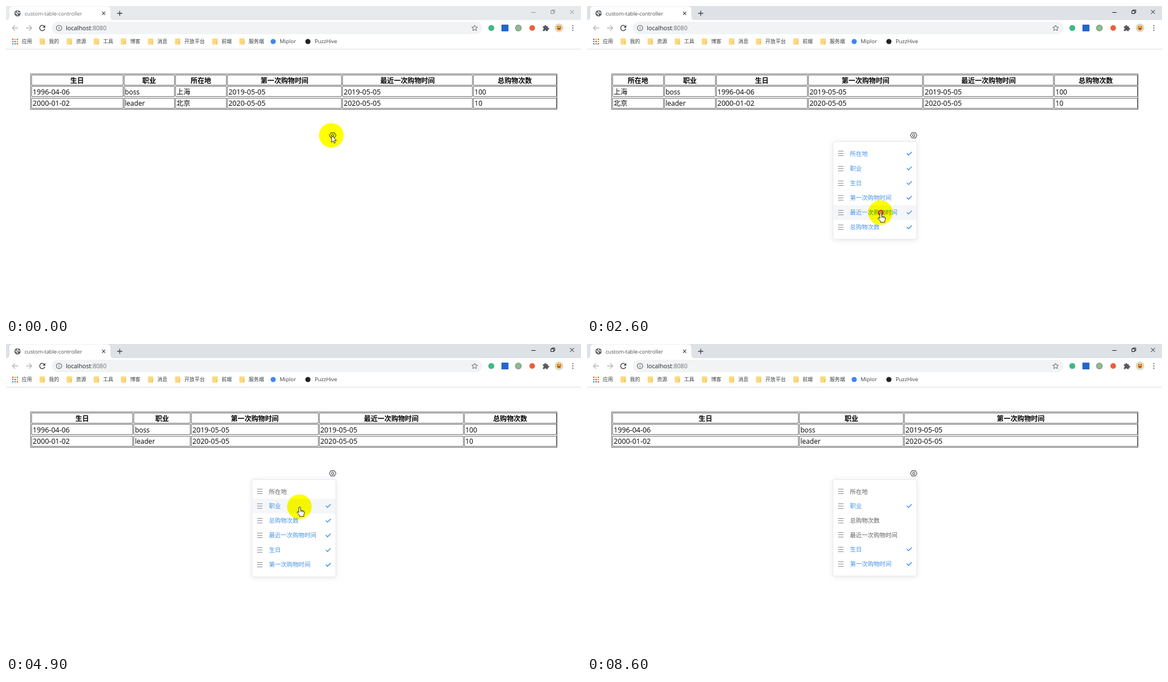
Recreate the animation shown at these times as an HTML page. Size 1019 px wide and 550 px high, loop 9100 ms.

```html
<!DOCTYPE html>
<html lang="zh-CN">
<head>
<meta charset="utf-8">
<title>custom-table-controller</title>
<style>
  html, body { margin: 0; width: 100%; height: 100%; overflow: hidden; background: #fff; }
  svg { display: block; font-family: "Open Sans", "Noto Sans CJK SC", "Noto Sans CJK", sans-serif; }
  #halo { mix-blend-mode: multiply; }
  .panel { filter: drop-shadow(0 1.5px 4px rgba(0, 0, 0, .1)); }
</style>
</head>
<body>
<svg width="1019" height="550" viewBox="0 0 1019 550">
  <rect width="1019" height="550" fill="#fff"/>
  <g id="browser"></g>
  <g id="table"></g>
  <g fill="none" stroke="#4a4d53" stroke-width="1.1">
    <path d="M576 224.9h6l2.9 4.6-2.9 4.6h-6l-2.9-4.6z"/><circle cx="579" cy="229.5" r="2"/>
  </g>
  <g id="menu"></g>
  <circle id="halo" r="21.8" fill="#ff0"/>
  <g id="pointer"></g>
</svg>
<script>
const LOOP = 9100, STEP = 100, OPEN = 300;
const BLUE = '#4593e6', GREY = '#5f6368', INK = '#3c4043', LINE = '#666';

// name, relative width, two body cells
const COLUMNS = [
  ['生日', 163, '1996-04-06', '2000-01-02'],
  ['职业', 91.7, 'boss', 'leader'],
  ['所在地', 91.7, '上海', '北京'],
  ['第一次购物时间', 204, '2019-05-05', '2020-05-05'],
  ['最近一次购物时间', 231.5, '2019-05-05', '2020-05-05'],
  ['总购物次数', 148, '100', '10'],
];

const drag = (press, release, from, to) => ({ press, release, from, to });
const click = (press, row) => drag(press, press + 100, row, row);
const GESTURES = [
  drag(1300, 1700, 0, 2), drag(2000, 2300, 1, 0), drag(2600, 2900, 4, 2), drag(3300, 3600, 5, 2),
  click(4600, 0), click(5000, 1), click(5600, 3), click(6500, 2), click(7600, 1),
];

// The pointer rests on a row, then travels to the next one just before pressing it.
function buildPath() {
  const path = [[0, 576.5, 229.5], [500, 576.5, 229.5], [900, 504.5, 272]];
  const visit = (t, row) => path.push([t, 520, 262.5 + 26 * row]);
  const rest = t => {
    const [time, x, y] = path[path.length - 1];
    path.push([Math.max(time, t), x, y]);
  };
  for (const { press, release, from, to } of GESTURES) {
    rest(press - 500);
    visit(press - 100, from);
    visit(press, from);
    visit(release, to);
  }
  rest(7900);
  path.push([8200, 540, 342], [8600, 645, 590]);
  return path;
}
const PATH = buildPath();

const $ = id => document.getElementById(id);
const text = (x, y, s, size, fill = '#000', more = '') =>
  `<text x="${x}" y="${y}" font-size="${size}" fill="${fill}" ${more}>${s}</text>`;
const line = (d, stroke, width = 1) =>
  `<path d="${d}" fill="none" stroke="${stroke}" stroke-width="${width}"/>`;
const rect = (x, y, w, h, fill, r = 0) =>
  `<rect x="${x}" y="${y}" width="${w}" height="${h}" rx="${r}" fill="${fill}"/>`;
const dot = (x, y, r, fill) => `<circle cx="${x}" cy="${y}" r="${r}" fill="${fill}"/>`;
const box = (x, y, w, h) => line(`M${x} ${y}h${w}v${h}h${-w}z`, LINE);

function drawTabStrip(active) {
  return rect(0, 0, 1019, 25, active ? '#dee1e6' : '#e7eaed')
    + '<path d="M0 25.2Q6 25 6 19V7Q6 .5 12.5 .5H178.5Q185 .5 185 7V19Q185 25 191 25.2Z" fill="#fff"/>'
    + dot(20.5, 13, 5.6, GREY)
    + line('M16.5 12l3 1.5 1 3M21 8.500l-1 2.500 3 1.500 2.500-.5', '#fff', 1.5)
    + text(33, 16.6, 'custom-table-controller', 9.3, active ? '#4a4d51' : '#6d7074')
    + line('M170.2 10.2l5.6 5.6m0-5.6l-5.6 5.6', INK, 1.2)
    + line('M197 13h9m-4.5-4.5v9', INK, 1.3)
    + line('M931 11.5h7.5M965.5 8.5h5v5h-5zM967.5 8.5v-1.5h5v5h-2M999.5 7l7 7m0-7l-7 7', active ? '#111' : '#8a8c8f');
}

function drawBookmarks() {
  const appColors = ['#ea4335', '#f9ab00', '#34a853', '#4285f4'];
  let out = '', x = 59.5;
  for (let i = 0; i < 9; i++) {
    out += rect(11 + i % 3 * 4, 58 + Math.floor(i / 3) * 4, 2.3, 2.3, appColors[i % 4]);
  }
  out += text(28, 66.4, '应用', 9.1, INK);
  for (const name of ['我的', '资源', '工具', '博客', '消息', '开放平台', '前端', '服务端']) {
    out += rect(x, 57.5, 9.5, 11, '#fad97f', 1) + line(`M${x + 7.5} 68v-5h2`, '#e9bd50')
      + text(x + 16.5, 66.4, name, 9.1, INK);
    x += 30 + 9 * name.length;
  }
  return out + dot(473.5, 63, 4.6, '#4285f4') + text(485, 66.4, 'Miplor', 9.5, INK)
    + dot(535, 63, 4.6, '#222') + text(547, 66.4, 'PuzzHive', 9.5, INK)
    + line('M0 76.5H1019', '#d9dbde');
}

function drawToolbar() {
  return line('M21.5 39H11.5m4.5-4.7L11.3 39l4.7 4.7M35.5 39h10m-4.5-4.7L45.7 39 41 43.7', '#b4b6b9', 1.3)
    + line('M68.2 36.3a4.7 4.7 0 1 0 .6 4.3', INK, 1.4)
    + `<path d="M69.5 33.8v4.6h-4.6z" fill="${INK}"/>`
    + rect(81, 28, 763, 22, '#f1f3f4', 11)
    + line('M89.2 39a4.8 4.8 0 1 0 9.6 0a4.8 4.8 0 1 0-9.6 0M94 38.4v3.2M94 36v1.2', GREY, 1.1)
    + text(106, 42.6, 'localhost<tspan fill="#6d7175">:8080</tspan>', 10.7, '#202124')
    + line('M830.5 34l1.5 3.3 3.6.4-2.7 2.4.8 3.5-3.2-1.8-3.2 1.8.8-3.5-2.7-2.4 3.6-.4z', GREY)
    + dot(860, 39, 5.3, '#41b883') + rect(878, 33, 12.5, 12, '#2467c9', 1)
    + dot(908, 39, 6, '#93a393') + dot(908, 39, 3.8, '#83c48b')
    + dot(932.5, 39, 5, '#e8603c')
    + '<path d="M951.5 36h2.7a1.7 1.7 0 1 1 3.3 0h2.8v2.8a1.7 1.7 0 1 1 0 3.2v2.5h-3a1.5 1.5 0 0 0-3 0h-2.8v-2.9a1.5 1.5 0 0 0 0-3z" fill="#55595e"/>'
    + dot(980, 38.7, 7.7, '#d9dadd') + dot(980, 38.7, 5, '#f5c846')
    + dot(978, 37, 1, '#5b4020') + dot(982, 37, 1, '#5b4020')
    + '<path d="M976.8 39h6.4a3.2 3.2 0 0 1-6.4 0z" fill="#c6383c"/>'
    + [35, 39, 43].map(y => dot(1004.5, y, 1.1, '#505357')).join('');
}

function stateAt(t) {
  const order = COLUMNS.map((_, i) => i), off = new Set();
  let toggled = false;
  for (const { release, from, to } of GESTURES) {
    if (release > t) break;
    if (from !== to) {
      order.splice(to, 0, ...order.splice(from, 1));
    } else {
      toggled = true;
      off.delete(order[from]) || off.add(order[from]);
    }
  }
  // toggling rebuilds the table in its default order
  const shown = toggled ? COLUMNS.map((_, i) => i).filter(i => !off.has(i)) : order;
  return { order, off, shown };
}

function drawTable(shown) {
  const total = shown.reduce((sum, i) => sum + COLUMNS[i][1], 0);
  let x = 45.3, out = box(43.5, 120.5, 933, 63);
  for (const i of shown) {
    const [name, weight, ...cells] = COLUMNS[i];
    const pitch = weight / total * 931.2;
    const left = Math.round(x) + .5, right = Math.round(x + pitch) - 1.5;
    for (let r = 0; r < 3; r++) out += box(left, Math.round(122 + 20.3 * r) + .5, right - left, 18);
    out += text(x + pitch / 2 - .8, 136.6, name, 12.1, '#000', 'font-weight="700" text-anchor="middle"');
    cells.forEach((s, r) => out += text(x + 2, 157 + r * 20.3, s, s.includes('-') ? 12.6 : 12.1));
    x += pitch;
  }
  return out;
}

function drawMenu({ order, off }, grow, px, py) {
  if (grow <= 0) return '';
  let y = 249, rows = '';
  for (const i of order) {
    const on = !off.has(i), h = on ? 26.1 : 25.35, mid = y + 12.9;
    if (px > 436 && px < 584 && py >= y && py < y + h) rows += rect(437, y, 147, h, '#f4f6f9');
    for (const d of [-4, 0, 4]) rows += line(`M445 ${Math.floor(mid) + d + .5}h9.5`, '#85888e');
    rows += text(466, mid + 3.8, COLUMNS[i][0], 10.5, on ? BLUE : '#606266');
    if (on) rows += line(`M566.8 ${mid - .3}l3 3 5.7-5.7`, BLUE, 1.5);
    y += h;
  }
  return `<g opacity="${grow}" transform="translate(0 ${240.5 * (1 - grow)}) scale(1 ${grow})">
    <rect class="panel" x="436" y="240.5" width="148.5" height="${y - 232.2}" rx="3" fill="#fff" stroke="#e6e9f0"/>${rows}</g>`;
}

function drawPointer(x, y, hand, pressed) {
  const shape = hand
    ? 'M-1.6 1.2Q0-1 1.6 1.2V6.3L6.3 7.3Q8.5 8 8.4 10L7.3 14.5V17H-.5V15L-4.5 10.5Q-5 8.5-3.2 8.8L-1.6 10.3Z'
    : 'M0 0V12.2L2.8 9.6 4.7 13.7 6.7 12.8 4.9 8.8H8.7Z';
  return `<g transform="translate(${x + .5} ${y + .3})">`
    + (pressed ? '<circle r="3.7" fill="none" stroke="#f00" stroke-width="2"/>' : '')
    + `<path d="${shape}" fill="#fff" stroke="#111" stroke-width=".9"/>`
    + (hand ? line('M1.6 6.5v3.2M4 7v2.7M6.2 7.5v2.4', '#111', .7) : '') + '</g>';
}

function positionAt(t) {
  const k = PATH.findIndex(p => p[0] > t);
  if (k < 0) return PATH[PATH.length - 1].slice(1);
  const [t0, x0, y0] = PATH[k - 1], [t1, x1, y1] = PATH[k];
  const f = (t - t0) / (t1 - t0);
  return [x0 + (x1 - x0) * f, y0 + (y1 - y0) * f];
}

let last = -1;
function frame() {
  const t = Math.floor(performance.now() % LOOP / STEP) * STEP;
  if (t !== last) {
    last = t;
    const [x, y] = positionAt(t), state = stateAt(t);
    const grow = Math.min(1, Math.max(0, (t - OPEN) / 300));
    const hand = grow === 1 && x > 436 && x < 584 && y > 249 && y < 405;
    const pressed = t === OPEN || GESTURES.some(g => t >= g.press && t < g.release);
    $('browser').innerHTML = drawTabStrip(t >= OPEN) + drawToolbar() + drawBookmarks();
    $('table').innerHTML = drawTable(state.shown);
    $('menu').innerHTML = drawMenu(state, grow, x, y);
    $('halo').setAttribute('cx', x);
    $('halo').setAttribute('cy', y);
    $('pointer').innerHTML = drawPointer(x, y, hand, pressed);
  }
  requestAnimationFrame(frame);
}
frame();
</script>
</body>
</html>
```
